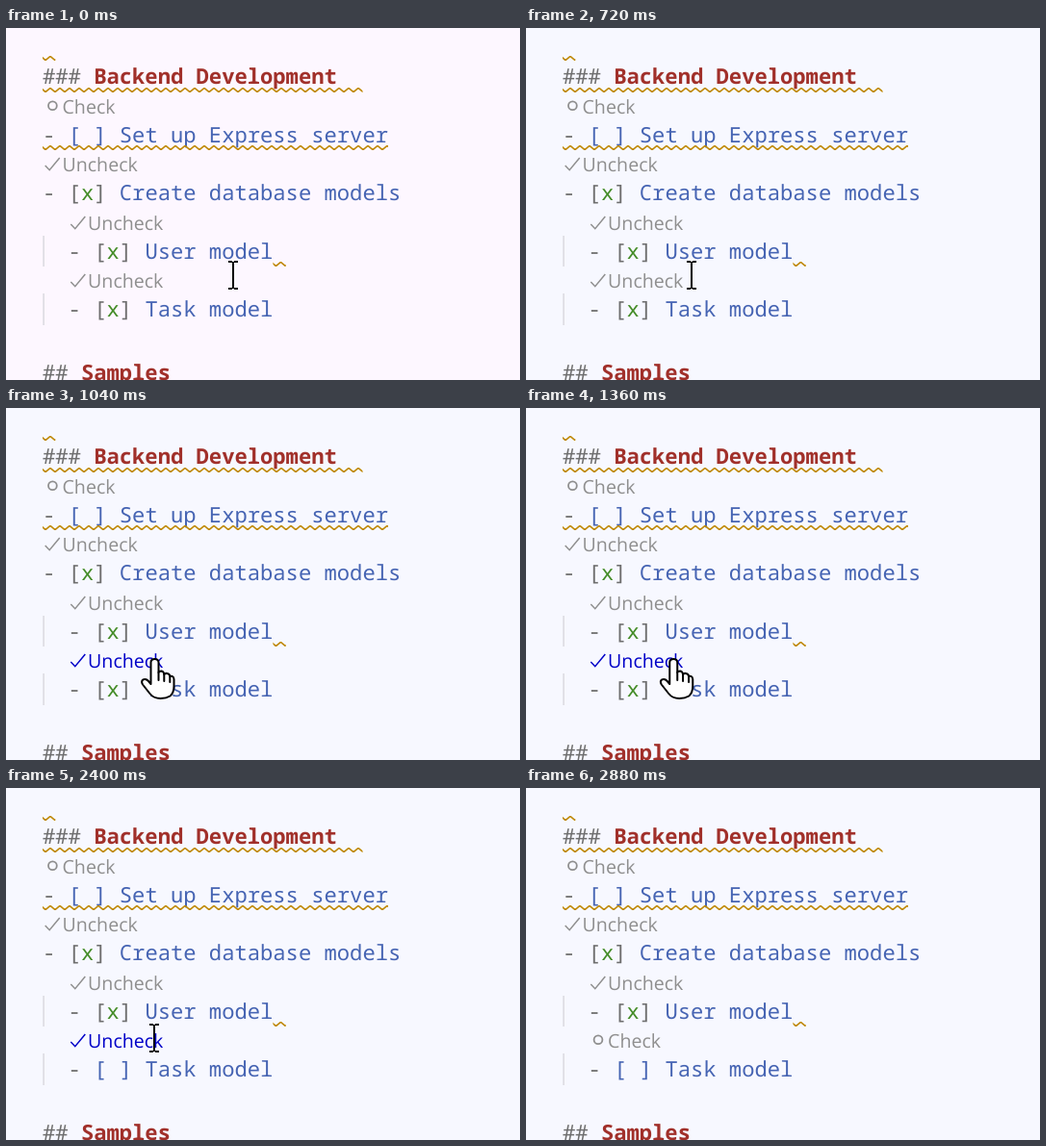
An HTML page with a canvas for the animation above (3.2 s loop, 534 by 366 pixels).

```html
<!DOCTYPE html>
<html lang="en">
<head>
<meta charset="utf-8">
<title>Checklist editing</title>
<style>
  html, body { margin: 0; width: 100%; height: 100%; overflow: hidden; background: #f7f8ff; }
  canvas { display: block; }
</style>
</head>
<body>
<canvas id="stage" width="534" height="366"></canvas>
<script>
const ctx = document.getElementById('stage').getContext('2d');
ctx.textRendering = 'geometricPrecision';

const LOOP = 3200, STEP = 80;
const LEFT = 38, CELL = 13.3, INDENT = 2 * CELL;
const MONO = '22.17px "Noto Sans Mono", "DejaVu Sans Mono", monospace';
const SANS = '19.6px "Open Sans", "Noto Sans", sans-serif';
const GREY = '#6e6e6e', BLUE = '#4664b3', RED = '#a1302a', GREEN = '#448c27';
const LENS = '#8f8f8f', LINK = '#0000c8', WARN = '#bf8803';

const CLICK = 1520, HOVER = 880, UNHOVER = 2320, REFRESH = 2480;

// time, x, y of the pointer hot spot
const PATH = [
  [0, 236, 257], [80, 222.5, 263], [160, 222.5, 263], [240, 209, 267],
  [320, 196, 263], [400, 186, 257], [480, 186, 257], [720, 172, 257],
  [1040, 154.5, 260], [1680, 152, 260], [2160, 152, 260], [2400, 154, 260],
  [2480, 160, 205], [2560, 172, 75], [2640, 180, -40], [LOOP, 180, -40]
];

const HAND = new Path2D(`M-4 24V4.5Q-4 1 0 1T4 4.5V15Q4.5 13.5 7 13.5Q9.5 14 9.8 17
  Q11 15.5 13 16Q15.5 16.5 15.8 19Q19.5 18 20 22V29Q20 36 16 39.5Q12 42 6 42
  Q-1 42-5 37L-12.5 27.5Q-14.5 24-12 22.3Q-9 21-6.5 24L-4 27Z`);
const KNUCKLES = new Path2D('M4 15V23M9.8 17V24M15.8 19V25');

function pointerAt(t) {
  const i = PATH.findIndex(k => k[0] > t);
  const a = PATH[i - 1], b = PATH[i];
  const u = (t - a[0]) / (b[0] - a[0]);
  return [a[1] + (b[1] - a[1]) * u, a[2] + (b[2] - a[2]) * u];
}

// Draws [text, colour] runs on the monospace grid.
function codeLine(x, y, runs, weight = 450) {
  ctx.font = `${weight} ${MONO}`;
  for (const [text, color] of runs) {
    ctx.fillStyle = color;
    ctx.fillText(text, x, y);
    x += text.length * CELL;
  }
}

function heading(y, marks, title) {
  codeLine(LEFT, y, [[marks, GREY]]);
  codeLine(LEFT + (marks.length + 1) * CELL, y, [[title, RED]], 700);
}

function task(x, y, done, label) {
  const box = done ? [['[', GREY], ['x', GREEN], ['] ', GREY]] : [['[ ] ', BLUE]];
  codeLine(x, y, [['- ', GREY], ...box, [label, BLUE]]);
}

function lens(x, y, done, color = LENS) {
  ctx.font = SANS;
  ctx.fillStyle = ctx.strokeStyle = color;
  ctx.fillText(done ? 'Uncheck' : 'Check', x + 20.5, y);
  ctx.beginPath();
  if (done) {
    ctx.lineWidth = 1.5;
    ctx.moveTo(x + 2.7, y - 5.5);
    ctx.lineTo(x + 7.2, y - 0.8);
    ctx.lineTo(x + 17.7, y - 13.5);
  } else {
    ctx.lineWidth = 1.8;
    ctx.arc(x + 10.4, y - 7.8, 4.4, 0, Math.PI * 2);
  }
  ctx.stroke();
}

function squiggle(x, y, cells) {
  const w = cells * CELL;
  ctx.save();
  ctx.beginPath();
  ctx.rect(x, y, w, 5);
  ctx.clip();
  ctx.beginPath();
  ctx.moveTo(x - 2, y);
  for (let i = 0; i * 5 < w + 5; i++) ctx.lineTo(x + 3 + i * 5, y + (i % 2 ? 0.4 : 4.6));
  ctx.strokeStyle = WARN;
  ctx.lineWidth = 1.6;
  ctx.stroke();
  ctx.restore();
}

function ibeam(x, y) {
  ctx.fillStyle = '#000';
  ctx.fillRect(x - 1, y - 14, 2, 28);
  for (const top of [y - 15, y + 13]) {
    ctx.fillRect(x - 5, top, 4, 2);
    ctx.fillRect(x + 1, top, 4, 2);
  }
}

function hand(x, y) {
  ctx.save();
  ctx.translate(x, y);
  ctx.lineJoin = ctx.lineCap = 'round';
  ctx.fillStyle = '#fff';
  ctx.strokeStyle = '#000';
  ctx.lineWidth = 2;
  ctx.fill(HAND);
  ctx.stroke(HAND);
  ctx.stroke(KNUCKLES);
  ctx.restore();
}

function draw(t) {
  const open = t >= CLICK, fresh = t >= REFRESH;
  const inner = LEFT + INDENT;
  ctx.fillStyle = t < 560 ? '#fdf7ff' : '#f7f8ff';
  ctx.fillRect(0, 0, 534, 366);

  ctx.fillStyle = '#dcdbe2';
  ctx.fillRect(38.3, 216, 1.6, 32);
  ctx.fillRect(38.3, 276, 1.6, 33);

  heading(58, '###', 'Backend Development');
  lens(LEFT, 88.5, false);
  task(LEFT, 119, false, 'Set up Express server');
  lens(LEFT, 148.5, true);
  task(LEFT, 179, true, 'Create database models');
  lens(inner, 209.5, true);
  task(inner, 240, true, 'User model');
  lens(inner, 269.5, !fresh, t >= HOVER && !fresh ? LINK : LENS);
  task(inner, 300, !open, 'Task model');
  heading(366, '##', 'Samples');

  squiggle(LEFT, 29, 1);
  squiggle(LEFT, 62, 25);
  squiggle(LEFT, 122, 27);
  squiggle(LEFT + 18 * CELL, 243, 1);

  const pointer = t >= HOVER && t < UNHOVER ? hand : ibeam;
  pointer(...pointerAt(t));
}

function tick(now) {
  draw(Math.floor((now % LOOP) / STEP) * STEP);
  requestAnimationFrame(tick);
}
draw(0);
requestAnimationFrame(tick);
</script>
</body>
</html>
```
